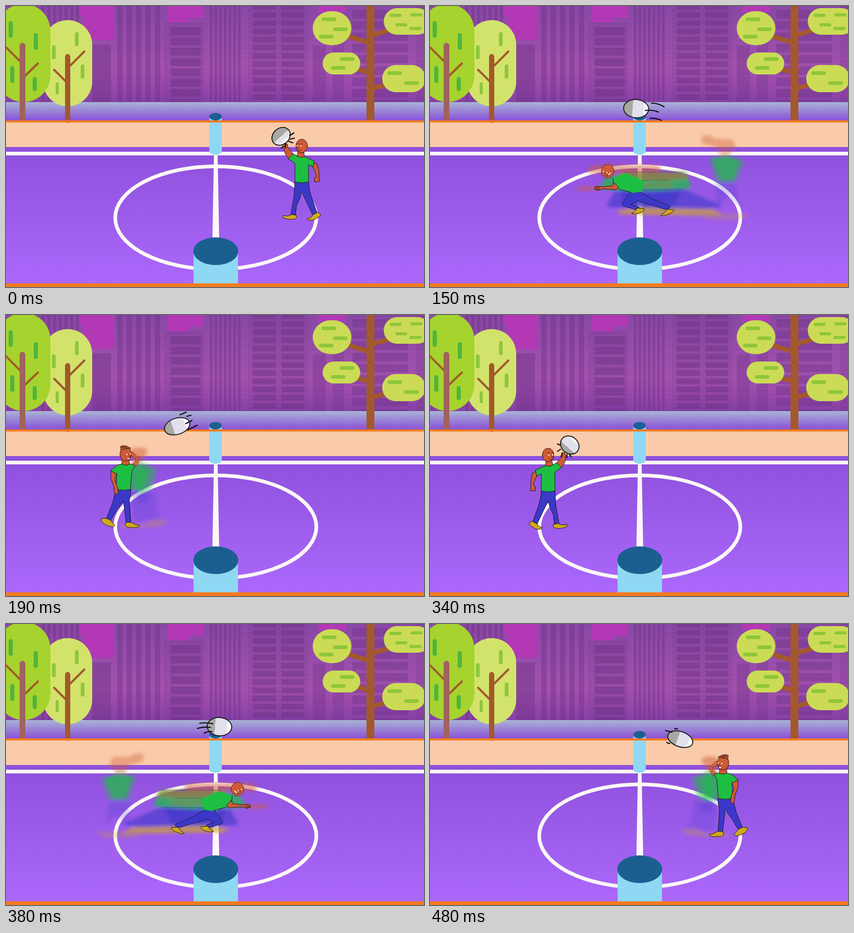
Recreate the animation shown at these times as an HTML page. Size 800 by 538 pixels, loop 0.58 s.

```html
<!DOCTYPE html>
<html lang="en">
<head>
<meta charset="utf-8">
<title>Ball over the post</title>
<style>
html, body { margin: 0; width: 100%; height: 100%; overflow: hidden; background: #9a5aea; }
svg { display: block; width: 100vw; height: 100vh; }
.ink { stroke: #17120f; stroke-width: .9; stroke-linejoin: round; stroke-linecap: round; }
.skin { fill: #cf5b36; }
.shirt { fill: #1dbf43; }
.jeans { fill: #3b38c9; }
.shoe { fill: #d0a81c; }
.face { fill: none; stroke: #5a1c10; stroke-width: .9; }
.blur { filter: url(#blur); stroke: none; }
.dash { fill: none; stroke: #0c0c0c; stroke-width: 2.1; stroke-linecap: round; }
.step { visibility: hidden; }
.wood { stroke: #a3592b; fill: none; }
</style>
</head>
<body>
<svg viewBox="0 0 800 538" preserveAspectRatio="none">
<defs>
  <linearGradient id="city" x2="0" y2="1">
    <stop stop-color="#8a48a6"/><stop offset=".65" stop-color="#a352ae"/>
    <stop offset=".85" stop-color="#9848ac"/><stop offset="1" stop-color="#8540a6"/>
  </linearGradient>
  <linearGradient id="haze" x2="0" y2="1"><stop stop-color="#a9b4d6"/><stop offset="1" stop-color="#8a4ed6"/></linearGradient>
  <linearGradient id="court" x2="0" y2="1"><stop stop-color="#8e50dc"/><stop offset="1" stop-color="#ab68fb"/></linearGradient>
  <filter id="blur" x="-20%" y="-30%" width="140%" height="160%"><feGaussianBlur stdDeviation="3"/></filter>

  <!-- throwing, facing left -->
  <g id="throw" class="ink">
    <path class="skin" d="M541 292Q534 285 533 277L532 268L535 263L539 265L539 271Q546 278 551 285Z"/>
    <path class="skin" d="M588 299L596 303Q600 315 599 329L600 336L591 337L590 329L594 327Q593 316 586 307Z"/>
    <path class="jeans" d="M553 337H579Q580 352 584 364L595 395L587 400L566 356Q563 370 556 382L554 400L545 400Q548 382 551 366Z"/>
    <path class="shoe" d="M530 401Q540 404 547 399L556 401Q558 406 552 408Q540 410 530 405Z"/>
    <path class="shoe" d="M577 407Q586 405 587 400L596 395Q602 396 602 401Q596 407 588 410Q577 411 577 407Z"/>
    <path class="skin" d="M559 277L557 288Q564 292 571 289L570 277Z"/>
    <path class="shirt" d="M540 292L550 283L557 287Q564 292 571 288L590 297L588 308L579 304L579 337Q566 340 553 337L553 301Z"/>
    <ellipse class="skin" cx="566" cy="268" rx="11" ry="13"/>
    <path class="face" d="M555 275Q560 279 565 275M560 268L557 272L560 273M556 264L559 263M563 264L567 264"/>
    <path d="M557 268h1M564 268h1" stroke="#fff" stroke-width="2"/>
  </g>

  <!-- running, facing left -->
  <g id="run">
    <g class="blur" opacity=".38">
      <path class="skin" d="M520 249Q535 244 546 254L579 255L586 270L570 287L556 287L548 270L520 263Z"/>
      <path class="shirt" d="M534 292L566 286L602 296L586 338H548Z"/>
      <path class="jeans" d="M546 338H584L592 385L572 362L548 392Z" opacity=".55"/>
      <path class="shoe" d="M518 401Q565 394 612 399Q600 412 565 409Q530 411 518 401Z" opacity=".65"/>
    </g>
    <g class="blur" opacity=".6">
      <path class="shirt" d="M540 292L570 288L594 297L580 333H556Z"/>
    </g>
    <g class="blur">
      <path class="jeans" d="M338 382L355 353L485 350L558 382L530 390L440 388L345 386Z" opacity=".6"/>
      <path class="jeans" d="M365 355L480 353L465 386L370 384Z" opacity=".6"/>
      <path class="shirt" d="M325 346L335 330L378 318L490 318L500 349L430 354L340 352Z" opacity=".75"/>
      <path class="skin" d="M302 311Q310 303 335 304L436 305Q446 311 438 318L305 321Z" opacity=".5"/>
      <path class="skin" d="M362 318H484L497 329L450 334L380 332Z" opacity=".5"/>
      <path class="skin" d="M400 340H465V346H400Z" opacity=".35"/>
      <path class="skin" d="M283 347H320V352H283Z" opacity=".8"/>
      <path class="shoe" d="M357 392L400 385L540 389L560 400L500 401L365 399Z" opacity=".65"/>
    </g>
    <path d="M372 318H484M384 334L460 333M395 352L485 351M405 370L450 386" stroke="#223" stroke-width=".8" opacity=".5"/>
    <g class="ink">
      <path class="jeans" d="M385 355L404 357L425 369L460 384L455 391L424 381L397 373L384 380L400 385L397 391L371 383Q366 380 370 375Z" stroke-width=".8"/>
      <path class="shoe" d="M386 397Q394 394 396 387L410 388Q411 393 402 396Q390 400 386 397Z"/>
      <path class="shoe" d="M442 401Q449 397 454 389L467 390Q466 396 455 399Q446 403 442 401Z"/>
      <path class="shirt" stroke="none" d="M350 329L376 320L410 336L404 356L386 358Q375 352 361 350Z"/>
      <path d="M350 329L351 341L362 351L386 357" fill="none"/>
      <path class="skin" d="M352 338L361 347L356 352L332 350L321 353L315 350L318 345L333 346L349 344Z"/>
      <path d="M316 348H325M316 351H324"/>
      <ellipse class="skin" cx="340" cy="316" rx="12" ry="13" stroke-width=".6"/>
      <path class="face" d="M334 323Q339 328 346 322M335 317L334 320L337 320"/>
      <path d="M332 317h1M338 319h1M345 320l-3 3" stroke="#fff" stroke-width="1.8"/>
    </g>
  </g>

  <!-- following through, facing right -->
  <g id="follow">
    <g class="blur" opacity=".5">
      <path class="skin" d="M238 258Q257 248 272 260L262 277L242 290Z"/>
      <path class="shirt" d="M238 290L257 281L289 295L278 332L262 340L240 335Z"/>
      <path class="jeans" d="M240 338H284L289 372L300 397L267 395L244 398Z" opacity=".4"/>
      <path class="jeans" d="M248 340H275L268 360L252 358Z" opacity=".7"/>
      <path class="shoe" d="M216 402L260 401L285 391L312 394Q300 406 270 406L220 408Z" opacity=".6"/>
    </g>
    <path class="shirt blur" d="M240 294L258 288L274 298L264 334H244Z" opacity=".65"/>
    <g class="ink">
      <path class="skin" d="M239 286Q248 283 249 275L237 268L242 262L255 274Q256 284 248 291Z" opacity=".85" stroke-opacity=".5"/>
      <path class="jeans" d="M211 334H239Q239 345 236 355L239 398L230 399L227 372Q225 362 225 356L211 375L200 394L192 390L204 360Z"/>
      <path class="shoe" d="M183 390L191 389L200 393Q205 400 208 402Q207 407 200 405Q185 401 182 393Z"/>
      <path class="shoe" d="M228 401L231 397L239 397Q247 402 256 403Q254 408 240 407Q227 407 228 401Z"/>
      <path class="skin" d="M222 275L222 287Q230 291 236 286L236 276Z"/>
      <path class="shirt" d="M201 297L214 287L222 285Q230 290 237 285L247 288L241 298L238 334Q225 337 211 334L212 303L205 306Z"/>
      <path class="skin" d="M201 298L212 305L208 315L214 331L215 341L211 344L207 339L207 330L201 314Z"/>
      <ellipse class="skin" cx="229" cy="266" rx="11" ry="13.5"/>
      <path class="skin" d="M220 258L219 252L223 250L231 251L239 255L230 256Z"/>
      <path d="M220 253L229 255M224 251L234 255"/>
      <path class="face" d="M230 275Q235 278 239 273M235 267L238 271L235 272"/>
      <path d="M231 267h1M238 266h1M233 275h3" stroke="#fff" stroke-width="1.8"/>
    </g>
  </g>
</defs>

<g id="back">
  <rect width="800" height="185" fill="url(#city)"/>
  <g id="blocks" fill="#66307f"></g>
  <path d="M140 0H207V65H155V52H148V20H140ZM309 0H378V22H350V31H309ZM598 0H651V12H598Z" fill="#b238b6"/>
  <rect y="184" width="800" height="36" fill="url(#haze)"/>
  <rect y="222" width="800" height="49" fill="#f9cbaa"/>
  <rect y="270" width="800" height="262" fill="url(#court)"/>
  <path d="M0 219H800V223H0ZM0 531H800V538H0Z" fill="#f47b20"/>
  <path d="M0 279H800V286H0ZM398 284H405L408 446H395Z" fill="#fbf8f5"/>
  <ellipse cx="401.5" cy="405.5" rx="192.5" ry="98.5" fill="none" stroke="#fbf8f5" stroke-width="7"/>
  <path d="M389 212H413V280Q401 290 389 280ZM359 470H444V531H359Z" fill="#8fd8f3"/>
  <ellipse cx="401" cy="212" rx="12" ry="7.2" fill="#1b5f90"/>
  <ellipse cx="401.5" cy="469.5" rx="43" ry="26.5" fill="#1b5f90"/>
  <g id="trees"></g>
</g>
<g id="steps"></g>
</svg>
<script>
const $ = id => document.getElementById(id);
const pill = (x, y, w, h, fill, r = Math.min(w, h) / 2) =>
  `<rect x="${x}" y="${y}" width="${w}" height="${h}" rx="${r}" fill="${fill}"/>`;
const pills = (list, w, h, fill) => list.map(([x, y]) => pill(x, y, w, h, fill)).join('');
const wood = (d, width, cap = 'round') =>
  `<path class="wood" d="${d}" stroke-width="${width}" stroke-linecap="${cap}"/>`;

// Skyline: plain stripes and stacked windows
const bar = (x, y, w, h, o) => `<rect x="${x}" y="${y}" width="${w}" height="${h}" opacity="${o}"/>`;
const rows = (x, w, y0, gap, h, o) => {
  let s = '';
  for (let y = y0; y < 184; y += gap) s += bar(x, y, w, Math.min(h, 184 - y), o);
  return s;
};
const stripes = (x0, x1, gap, w, y) => {
  let s = '';
  for (let x = x0; x < x1; x += gap) s += bar(x, y, w, 184 - y, .38);
  return s;
};
$('blocks').innerHTML =
  stripes(68, 140, 11, 6, 0) + bar(165, 74, 36, 110, .38) +
  stripes(213, 300, 18, 10, 0) + bar(303, 30, 76, 154, .14) +
  stripes(390, 450, 9, 5, 0) + bar(463, 0, 117, 184, .12) +
  rows(315, 58, 41, 19.6, 15, .42) +
  rows(472, 45, -4, 15.7, 11, .42) + rows(527, 44, -4, 15.7, 11, .42) +
  bar(587, 76, 25, 108, .3) + bar(625, 20, 22, 164, .25) +
  rows(663, 107, 8, 21.5, 16, .35) + bar(785, 0, 15, 184, .18) +
  rows(0, 800, 0, 8, 3, .05);

const lime = '#cbdb55', leaf = '#8fc63a', deep = '#4fb53c';
$('trees').innerHTML =
  pill(71, 27, 94, 165, '#d2e36c') +
  pills([[88, 75], [132, 50], [143, 112]], 7, 27, leaf) + pill(95, 146, 6, 23, leaf) +
  wood('M118 219V97', 10) + wood('M150 87L118 119M92 122L118 148', 4) +
  '<path d="M110 219h16v6h-16Z" fill="#f47b20" opacity="0"/>' +
  pill(-18, -4, 103, 188, '#a6d32e') +
  pills([[5, 29], [53, 52], [8, 115]], 8, 32, deep) + pill(51, 136, 8, 27, deep) +
  wood('M-4 75L31 110M61 110L31 139', 4) +
  '<path d="M26 219V76a5.500 5.500 0 0 1 11 0V219Z" fill="#a0625d"/>' +
  wood('M697.500 0V219', 15, 'butt') +
  wood('M652 57L694 70M738 45L700 56M670 120L694 127M728 150L700 158', 9, 'butt') +
  pill(587, 10, 74, 65, lime, 35) + pill(606, 89, 72, 42, lime) +
  pill(723, 4, 90, 51, lime) + pill(720, 113, 83, 52, lime) +
  pills([[604, 22], [626, 41], [599, 55], [639, 98], [622, 115], [730, 125], [762, 144]], 28, 7, leaf) +
  pills([[734, 15], [774, 14], [745, 33], [772, 40]], 23, 6, leaf) +
  '<path d="M0 219H800V223H0Z" fill="#f47b20"/>';

// Each step: end time, pose, mirror width, ball [x, y, rx, ry, turn, shade], speed dashes
const steps = [
  [90, 'throw', 0, [526.5, 249.5, 15.5, 19, 48, .5],
    'M543 248L551 243M544 255L552 253M541 259L549 262M527 272L531 268M535 265V271'],
  [190, 'run', 0, [394.5, 196.5, 24, 17.5, 4, .36],
    'M424 186Q437 186 448 193M412 200Q425 198 437 203M421 215Q432 214 443 219'],
  [280, 'follow', 0, [327.5, 213, 25, 15.5, -18, .33],
    'M333 191L345 186M346 194L354 192M344 208L356 202M348 220L366 211'],
  [380, 'throw', 792, [267.5, 249, 16, 19, -48, .32],
    'M249 249L244 247M250 257L244 261M253 264L251 271M262 267V273M267 267L270 271'],
  [480, 'run', 783, [408.5, 196.5, 23.5, 17.5, 4, .32],
    'M371 190Q383 188 396 191M366 200Q378 196 391 198M379 209Q387 205 394 206'],
  [580, 'follow', 790, [479, 220.5, 25, 14.5, 20, .4],
    'M451 204L463 207M453 227L459 229M468 200L474 201'],
];
const ball = ([x, y, rx, ry, turn, cut], i) => `
  <linearGradient id="ball${i}">
    <stop offset="${cut}" stop-color="#a9a9a4"/><stop offset="${cut}" stop-color="#e1e0ec"/>
    <stop offset=".78" stop-color="#e1e0ec"/><stop offset=".84" stop-color="#fafafc"/>
  </linearGradient>
  <ellipse rx="${rx}" ry="${ry}" transform="translate(${x} ${y}) rotate(${turn})"
    fill="url(#ball${i})" stroke="#171717" stroke-width="1.8"/>`;
$('steps').innerHTML = steps.map(([, pose, flip, spec, dash], i) => `
  <g class="step">
    <use href="#${pose}" ${flip ? `transform="translate(${flip} 0) scale(-1 1)"` : ''}/>
    ${ball(spec, i)}<path class="dash" d="${dash}"/>
  </g>`).join('');

const views = [...$('steps').children];
function draw(now) {
  const t = now % 580, on = steps.findIndex(s => t < s[0]);
  views.forEach((v, i) => v.style.visibility = i === on ? 'visible' : 'hidden');
  requestAnimationFrame(draw);
}
draw(performance.now());
</script>
</body>
</html>
```
